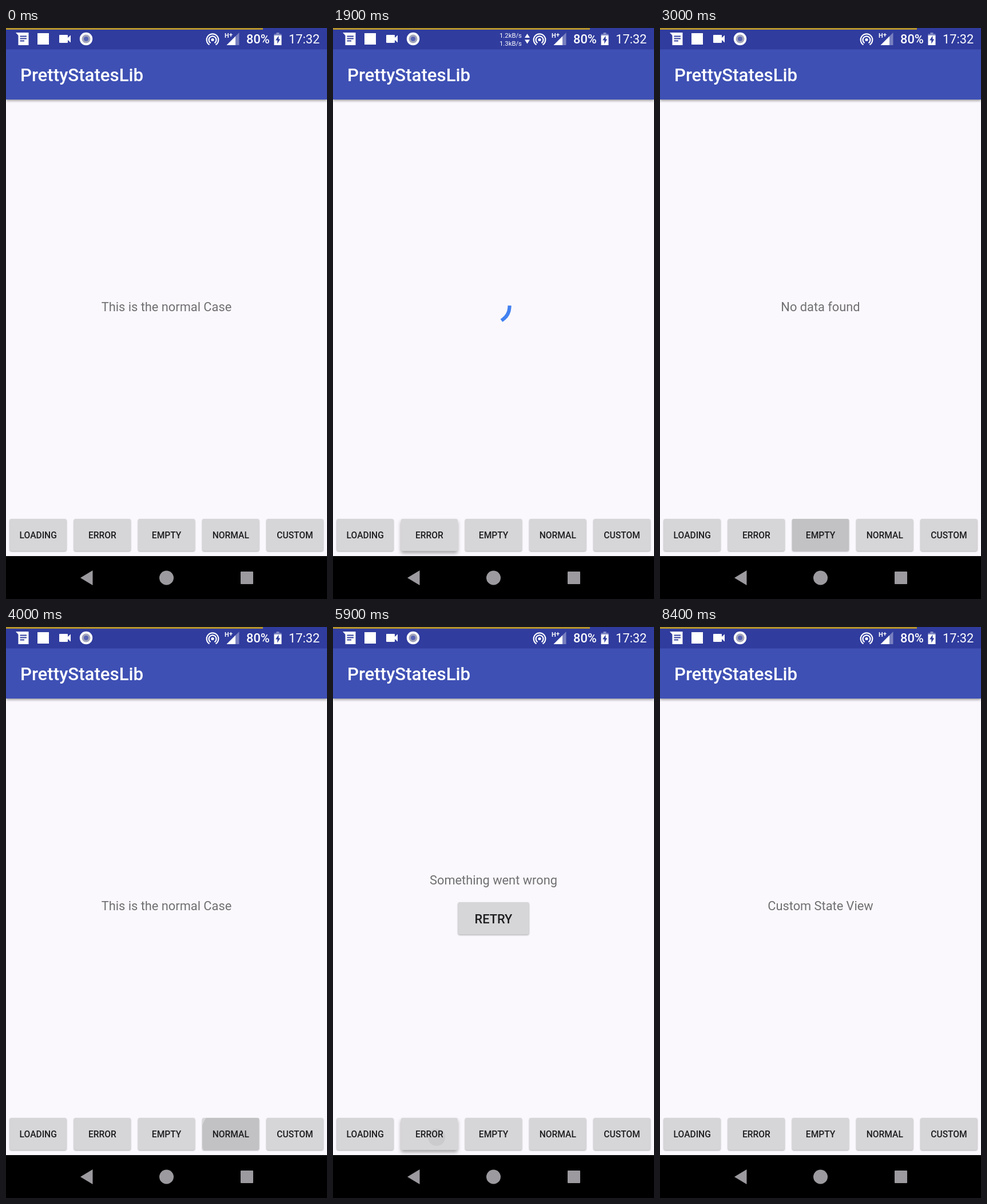
Recreate the animation shown at these times as an HTML page. Size 561 by 998 pixels, loop 8500 ms.

```html
<!DOCTYPE html>
<html lang="en">
<head>
<meta charset="utf-8">
<title>PrettyStatesLib</title>
<style>
  html, body { margin: 0; width: 100%; height: 100%; overflow: hidden; background: #faf8fc; }
  svg { display: block; width: 100%; height: 100%; }
  text { font-family: Roboto, sans-serif; font-size: 21.8px; }
  .mid { text-anchor: middle; }
  .medium { font-weight: 500; }
  .message { fill: #706f72; }
  .button { fill: #d6d5d7; filter: drop-shadow(0 1.5px 1.3px #0005); }
  .raised { filter: drop-shadow(0 4px 3px #0005); }
  .label { font-size: 15.58px; font-weight: 500; fill: #1d1c1e; }
  .speed { font-size: 11.3px; }
  .bar { filter: drop-shadow(0 2px 2px #0006); }
</style>
</head>
<body>
<svg viewBox="0 0 561 998">
  <rect width="561" height="998" fill="#faf8fc"/>
  <rect class="bar" width="561" height="125" fill="#3e50b4"/>
  <rect width="561" height="37.5" fill="#303c9e"/>
  <rect width="449" height="3" fill="#b4942f"/>
  <text class="medium" x="25" y="93" fill="#fff" style="font-size:31.2px">PrettyStatesLib</text>

  <g id="status" fill="#fff">
    <path d="M17 8H39.500V30H21.500V13Z"/>
    <path d="M24.500 14.500H36M24.500 18.500H36M24.500 22.500H32" stroke="#303c9e" stroke-width="2"/>
    <rect x="55" y="9" width="20" height="20"/>
    <path d="M94 12H107Q108 12 108 13V17L113 12.500V25.500L108 21V25Q108 26 107 26H94Q93 26 93 25V13Q93 12 94 12Z"/>
    <circle cx="140" cy="19" r="11.200"/>
    <circle cx="140" cy="19" r="7.500" fill="#a3a5bb"/>
    <circle cx="140" cy="19" r="4" fill="#5964b5"/>
    <g id="speed">
      <text class="speed" x="291" y="17">1.2kB/s</text>
      <text class="speed" x="291" y="31">1.3kB/s</text>
      <path d="M335 17L339.500 10L344 17ZM335 20.500H344L339.500 27.500Z"/>
    </g>
    <circle cx="361" cy="20.500" r="2.600"/>
    <path d="M357.500 26.300A6.500 6.500 0 1 1 364.500 26.300M355.500 29.300A10.300 10.300 0 1 1 366.500 29.300"
      fill="none" stroke="#fff" stroke-width="2.200"/>
    <text x="382" y="17" style="font-size:11px;font-weight:700">H</text>
    <text x="390" y="16" style="font-size:11px;font-weight:700">+</text>
    <path d="M385.500 30L407.500 8V30Z" opacity=".35"/>
    <path d="M385.500 30L401 14.500V30Z"/>
    <text class="medium" x="420" y="27">80%</text>
    <path d="M472.500 8H477.500V10.500H481.500V14H468.500V10.500H472.500Z" opacity=".4"/>
    <path d="M468.500 13H481.500V30H468.500Z"/>
    <path d="M476.500 13.500L471 21.500H474.300V27.500L479.300 19.500H476.500Z" fill="#303c9e"/>
    <text x="494" y="27">17:32</text>
  </g>

  <text id="message" class="mid message" x="280.500" y="495"></text>
  <g id="retry">
    <rect class="button" x="218.500" y="481" width="124" height="56.500" rx="3"/>
    <text class="mid medium" x="280.500" y="517.700" fill="#1d1c1e">RETRY</text>
  </g>
  <path id="spinner" fill="none" stroke="#4281f1" stroke-width="6.200" stroke-linecap="square"/>
  <g id="buttons"></g>

  <rect y="923" width="561" height="75"/>
  <g fill="#9c9a9f">
    <path d="M130 961L151.500 948V974Z"/>
    <circle cx="280.500" cy="961" r="12.500"/>
    <rect x="410" y="950" width="22" height="22" rx="1"/>
  </g>
</svg>
<script>
const LOOP = 8500, STEP = 100;
const labels = ['LOADING', 'ERROR', 'EMPTY', 'NORMAL', 'CUSTOM'];
const messages = ['', 'Something went wrong', 'No data found', 'This is the normal Case', 'Custom State View'];

// Each tap: button, press / state change / release times, touch point, ripple radii per step
const taps = [
  { button: 0, down: 700, at: 900, up: 1100, x: 60, y: 888, radii: [15, 70] },
  { button: 1, down: 1900, at: 2000, up: 2100, x: 172, y: 888, radii: [15] },
  { button: 2, down: 2900, at: 3000, up: 3300, x: 280, y: 888, radii: [70] },
  { button: 3, down: 3800, at: 3900, up: 4300, x: 398, y: 890, radii: [15, 58] },
  { button: 2, down: 4800, at: 4900, up: 5100, x: 280, y: 888, radii: [15, 70] },
  { button: 1, down: 5800, at: 5900, up: 6100, x: 181, y: 892, radii: [15, 70] },
  { button: 4, down: 6900, at: 7000, up: 7200, x: 504, y: 885, radii: [15, 70] },
];

const $ = id => document.getElementById(id);
const show = (node, on) => { node.style.display = on ? '' : 'none'; };

$('buttons').innerHTML = labels.map((label, i) => {
  const x = 6.5 + 112.2 * i;
  const box = `x="${x}" y="858" width="99.2" height="56" rx="3"`;
  return `<clipPath id="clip${i}"><rect ${box}/></clipPath>
    <rect class="button" ${box}/>
    <circle class="ripple" clip-path="url(#clip${i})"/>
    <text class="mid label" x="${x + 49.7}" y="891.7">${label}</text>`;
}).join('');
const boxes = [...document.querySelectorAll('#buttons .button')];
const ripples = [...document.querySelectorAll('.ripple')];

// cubic-bezier(.4, 0, .2, 1)
function ease(x) {
  let lo = 0, hi = 1, s;
  for (let i = 0; i < 20; i++) {
    s = (lo + hi) / 2;
    const bx = 1.2 * s * (1 - s) ** 2 + 0.6 * s * s * (1 - s) + s ** 3;
    if (bx < x) lo = s; else hi = s;
  }
  return s * s * (3 - 2 * s);
}

function spinnerPath(age) {
  const u = age % 1333 / 1333;
  const turn = 90 * u + 720 * age / 4444 - 90;
  const from = 270 * ease(Math.max(0, 2 * u - 1)) + turn;
  const to = Math.max(270 * ease(Math.min(1, 2 * u)) + turn, from + 1);
  const point = deg => {
    const a = deg * Math.PI / 180;
    return `${280.5 + 28 * Math.cos(a)} ${486.7 + 28 * Math.sin(a)}`;
  };
  return `M${point(from)}A28 28 0 ${to - from > 180 ? 1 : 0} 1 ${point(to)}`;
}

function draw(t) {
  let state = 3;
  boxes.forEach(b => b.classList.remove('raised'));
  ripples.forEach(r => r.setAttribute('r', 0));
  for (const { button, down, at, up, x, y, radii } of taps) {
    if (t >= at) state = button;
    if (t < down || t >= up) continue;
    const step = Math.min((t - at) / STEP, radii.length - 1);
    const wide = radii[step] > 50;
    boxes[button].classList.toggle('raised', !wide);
    if (t < at) continue;
    const ripple = ripples[button];
    ripple.setAttribute('cx', x);
    ripple.setAttribute('cy', y);
    ripple.setAttribute('r', radii[step]);
    ripple.setAttribute('fill', wide ? '#c2c1c3' : '#cbcacc');
  }
  $('message').textContent = messages[state];
  $('message').setAttribute('y', state === 1 ? 449.7 : 495);
  show($('retry'), state === 1);
  show($('spinner'), state === 0);
  if (state === 0) $('spinner').setAttribute('d', spinnerPath(t - 880));
  show($('speed'), t >= 1000 && t < 3000);
}

const start = performance.now();
function tick() {
  const t = (performance.now() - start) % LOOP;
  draw(Math.floor(t / STEP) * STEP);
  requestAnimationFrame(tick);
}
tick();
</script>
</body>
</html>
```
